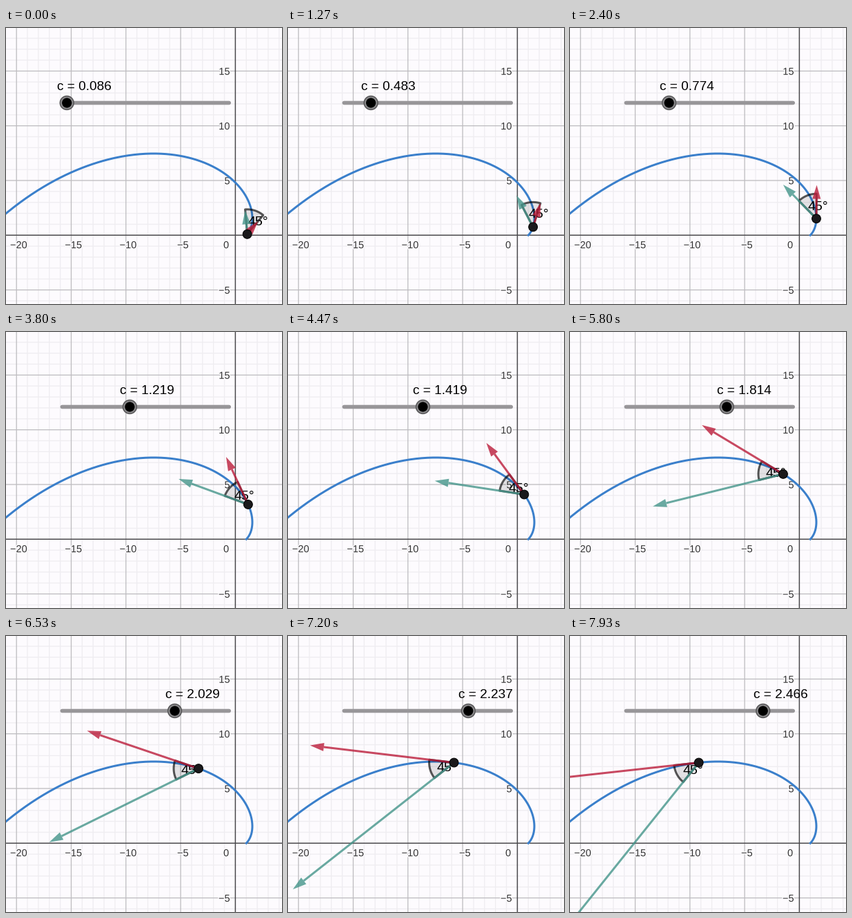
Recreate the animation shown at these times as a matplotlib script. Size 400 px wide and 400 px high, loop 8000 ms.

```python
import numpy as np
import matplotlib.pyplot as plt
from matplotlib.animation import FuncAnimation
from matplotlib.patches import Circle, Polygon
from matplotlib.patheffects import withStroke

SIZE, DPI = 400, 100
LOOP, TICK = 8000, 20              # ms
STEP = LOOP / 120                  # the picture advances 15 times a second
PT = 72 / DPI                      # points per pixel
OX, OY, UNIT = 332.4, 300.3, 15.86
BG = "#fdfbfe"
BLUE, RED, TEAL = "#3a7fcb", "#bb1c3a", "#44958a"
ARC_R, HEAD_LEN, HEAD_HALF = 36, 20, 6

plt.rcParams["font.family"] = "Liberation Sans"
fig = plt.figure(figsize=(SIZE / DPI, SIZE / DPI), dpi=DPI, facecolor=BG)
ax = fig.add_axes([0, 0, 1, 1])
ax.set_xlim(0, SIZE)
ax.set_ylim(SIZE, 0)
ax.axis("off")


def to_px(x, y):
    return np.array([OX + UNIT * x, OY - UNIT * y])


def stroke(xs, ys, color, width, z, **kw):
    return ax.plot(xs, ys, color=color, lw=width * PT, zorder=z, snap=False,
                   **kw)[0]


def label(x, y, s, size, z, ha="left", color="black"):
    return ax.text(x, y, s, fontsize=size * PT, ha=ha, va="baseline",
                   color=color, zorder=z)


def draw_grid():
    for n in range(-21, 19):
        major = n % 5 == 0
        color, z = ("#bebdc0", 1.1) if major else ("#efedf1", 1)
        if n == 0:
            color, z = "#48474a", 1.2
        width = 1.5 if n == 0 else 1.3
        x, y = to_px(n, n)
        stroke([x, x], [0, SIZE], color, width, z)
        stroke([0, SIZE], [y, y], color, width, z)


def axis_label(x, y, n, ha):
    text = label(x, y, str(n).replace("-", "\u2212"), 14.6, 2, ha, "#333333")
    text.set_path_effects([withStroke(linewidth=3 * PT, foreground=BG)])


draw_grid()
for n in (-20, -15, -10, -5):
    axis_label(to_px(n, 0)[0] + 3.2, 319.2, n, "center")
for n in (-5, 5, 10, 15):
    axis_label(324.6, to_px(0, n)[1] + 5.4, n, "right")
axis_label(323.3, 319.2, 0, "right")

# Logarithmic spiral e^t (cos t, sin t)
s = np.linspace(0, 3.2, 400)
stroke(*to_px(np.exp(s) * np.cos(s), np.exp(s) * np.sin(s)), BLUE, 3, 3)

# Slider
stroke([81.3, 323.3], [108.5, 108.5], "#989699", 5.6, 3,
       solid_capstyle="round")
ring = Circle((0, 108.5), 9.9, fc="#8b8a8c", ec="#555456", lw=1.5 * PT, zorder=4)
knob = Circle((0, 108.5), 7.1, fc="black", lw=0, zorder=5)
value = label(0, 90, "", 19, 5)

# Angle sector, its label and the moving point
sector = Polygon([(0, 0)] * 3, fc=(0, 0, 0, 0.1), ec=(0, 0, 0, 0.65),
                 lw=3 * PT, joinstyle="round", zorder=6)
angle = label(0, 0, "45\u00b0", 19.5, 7)
dot = Circle((0, 0), 6.4, fc="#1a191b", ec="black", lw=1 * PT, zorder=10)
for patch in (ring, knob, sector, dot):
    patch.set_snap(False)
    ax.add_patch(patch)


class Arrow:
    def __init__(self, color, z):
        self.line = stroke([], [], color, 3, z, alpha=0.8,
                           solid_capstyle="butt")
        self.head = Polygon([(0, 0)] * 3, fc=color, lw=0, alpha=0.8, zorder=z)
        ax.add_patch(self.head)

    def place(self, start, length, direction):
        u = np.array([np.cos(direction), -np.sin(direction)])
        side = HEAD_HALF * np.array([-u[1], u[0]])
        tip = start + length * u
        base = tip - HEAD_LEN * u
        self.line.set_data(*zip(start, base))
        self.head.set_xy([tip, base + side, base - side])


second = Arrow(TEAL, 8)
first = Arrow(RED, 8.5)

KEY_STEPS = [0, 19, 36, 37, 57, 76, 98, 119]
KEY_VALUES = [0.086, 0.483, 0.774, 0.774, 1.219, 1.599, 2.029, 2.466]


def update(tick):
    step = min((tick + 1) * TICK // STEP, KEY_STEPS[-1])
    c = np.interp(step, KEY_STEPS, KEY_VALUES)
    r = np.exp(c)
    p = to_px(r * np.cos(c), r * np.sin(c))

    kx = 81.3 + 80.46 * c
    ring.center = knob.center = (kx, 108.5)
    value.set_text(f"c = {c:.3f}")
    value.set_x(kx - 14)

    # First derivative turns by 45 degrees, the second by 90
    a, b = c + np.pi / 4, c + np.pi / 2
    first.place(p, np.sqrt(2) * r * UNIT, a)
    second.place(p, 2 * r * UNIT, b)

    arc = np.linspace(a, b, 30)
    rim = p + ARC_R * np.column_stack([np.cos(arc), -np.sin(arc)])
    sector.set_xy(np.vstack([p, rim]))
    mid = (a + b) / 2
    angle.set_position((p[0] + 20.5 * np.cos(mid) - 5,
                        p[1] - 20.5 * np.sin(mid) + 7))
    dot.center = tuple(p)
    return ()


anim = FuncAnimation(fig, update, frames=LOOP // TICK, interval=TICK,
                     init_func=lambda: update(0), repeat=True, repeat_delay=0)
plt.show()
```
